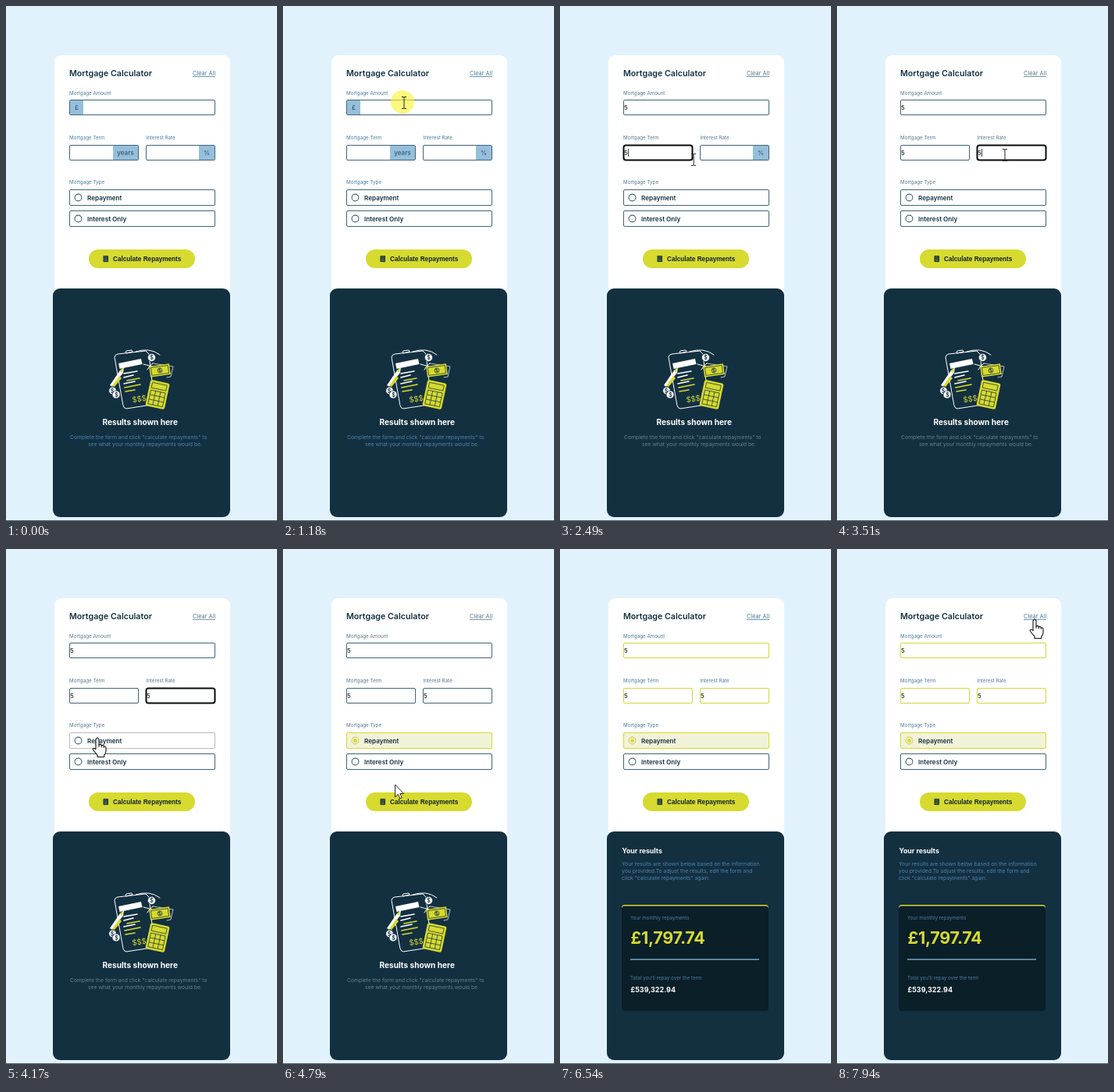
An HTML page that plays this animation: 347 px wide and 660 px high, repeating every 8 s.

```html
<!DOCTYPE html>
<html lang="en">
<head>
<meta charset="utf-8">
<title>Mortgage Calculator</title>
<style>
  html, body { margin: 0; width: 100%; height: 100%; overflow: hidden; background: #e1f2fd; }
  svg { display: block; width: 347px; height: 660px; font-family: Inter, "Open Sans", sans-serif; --soft: #4a7c9f; --sub: #4d84ad; }
  svg.muted { --soft: #58788b; --sub: #64818f; }
  .label { font-size: 6.25px; fill: var(--soft); }
  .sub { font-size: 6.8px; fill: var(--sub); }
  .bold { font-weight: 700; fill: #fff; }
  .dark { font-weight: 600; fill: #133041; }
  .unit { font-size: 8px; font-weight: 600; fill: #40657c; text-anchor: middle; }
  .box { fill: #fff; stroke: #41647a; }
  .box.hover { stroke: #b9bdbd; }
  .box.valid { stroke: #d3d63e; }
  .box.chosen { fill: #f2f2d8; stroke: #d7da2f; }
  .box.focus { stroke: #080c0f; stroke-width: 2; }
  .lime { fill: #d7da2f; }
  .pen { fill: none; stroke: #fff; stroke-linecap: round; stroke-linejoin: round; }
  .limePen { fill: none; stroke: #d7da2f; stroke-linecap: round; stroke-width: 1.6; }
  .ink { fill: none; stroke: #133041; stroke-width: .7; }
</style>
</head>
<body>
<svg id="stage" viewBox="0 0 347 660">
  <rect width="347" height="660" fill="#e1f2fd"/>
  <rect y="659" width="347" height="1" fill="#4b5f6c"/>
  <path d="M62 400V72a9 9 0 0 1 9-9h207a9 9 0 0 1 9 9v328z" fill="#fff"/>
  <rect x="60" y="362" width="227" height="293" rx="9" fill="#133041"/>

  <text x="81" y="90" class="dark" font-size="10.7">Mortgage Calculator</text>
  <text x="239" y="89" font-size="7.4" fill="var(--soft)">Clear All</text>
  <path d="M239 90.5h29" stroke="var(--soft)" stroke-width=".8"/>
  <text x="81" y="114" class="label">Mortgage Amount</text>
  <text x="81" y="171" class="label">Mortgage Term</text>
  <text x="179.5" y="171" class="label">Interest Rate</text>
  <text x="81" y="228" class="label">Mortgage Type</text>
  <g id="fields"></g>
  <g id="rows"></g>

  <rect x="106" y="312" width="136" height="24" rx="12" class="lime"/>
  <rect x="124.5" y="320" width="6.5" height="8" rx=".8" fill="#133041"/>
  <path d="M125.7 321.8h4.1M125.7 324.4h4.1M125.7 326.4h4.1" stroke="#d7da2f" stroke-width=".8" stroke-dasharray="1 .55"/>
  <text x="137" y="327" font-family="'Liberation Sans', Arial, sans-serif" font-weight="700" font-size="8.2" fill="#10222d">Calculate Repayments</text>

  <g id="empty">
    <path class="pen" d="M139 450q0-3 4-4l36-4 4 4 7 62q-4 3-10 4l-26 4q-3 0-4-4z"/>
    <path class="pen" d="M153 444l1-2 7-1 1 2-8 2M166 443q18-6 31 4M181 466q3-6 7-8M176 459l11 3"/>
    <path d="M144 458l29-6 1.5 7-29 6z" fill="#fff"/>
    <path class="pen" stroke-width="1.6" d="M151 471l17-3M151 476l12-3M151 484l14-3"/>
    <path class="limePen" d="M155 480l16-3M152 489l20-4M153 494l12-2"/>
    <path d="M133 486l13-19 5-4-1 7-14 18z" fill="#fff"/>
    <path class="lime" d="M136 487l9-13 3 3-9 11zM150 463l-4 5 3 2z"/>
    <text x="162" y="508" font-size="9.5" class="lime" transform="rotate(-8 162 508)">$$$</text>
    <g fill="#fff" stroke="#133041" stroke-width=".7">
      <circle cx="186.5" cy="450.5" r="5"/><circle cx="136.5" cy="493" r="4.8"/><circle cx="141" cy="498" r="5"/>
    </g>
    <g font-size="7" text-anchor="middle" class="dark">
      <text x="186.5" y="453">$</text><text x="136" y="495.5">$</text><text x="141.5" y="500.5">$</text>
    </g>
    <path class="pen" stroke-width=".7" d="M188 458l26 4-3 13-5 1"/>
    <g transform="rotate(-8 197 467)">
      <rect x="184" y="460" width="26" height="14" class="lime"/>
      <rect x="186" y="462" width="22" height="10" class="ink"/><circle cx="197" cy="467" r="3" class="ink"/>
      <text x="197" y="469" font-size="6" text-anchor="middle" class="dark">$</text>
    </g>
    <g transform="rotate(12 194 498)">
      <rect x="181.5" y="481" width="25" height="34" rx="2.5" class="lime"/>
      <rect x="184.5" y="484" width="19" height="7" class="ink"/>
      <path class="ink" d="M184.5 494h19v18h-19zM190.8 494v18M197.2 494v18M184.5 500h19M184.5 506h19"/>
    </g>
    <text x="123.5" y="537" class="bold" font-size="10.1">Results shown here</text>
    <text x="82" y="555" class="sub">Complete the form and click "calculate repayments" to</text>
    <text x="105" y="564" class="sub">see what your monthly repayments would be.</text>
  </g>

  <g id="results">
    <text x="79.5" y="390" class="bold" font-size="8.75">Your results</text>
    <text x="79" y="406" class="sub">Your results are shown below based on the information</text>
    <text x="79" y="415" class="sub">you provided.To adjust the results, edit the form and</text>
    <text x="79" y="424" class="sub">click "calculate repayments" again.</text>
    <rect x="79" y="456" width="188" height="12" rx="4" class="lime"/>
    <path d="M79 461q0-3.5 4-3.5h180q4 0 4 3.5v127a4 4 0 0 1-4 4H83a4 4 0 0 1-4-4z" fill="#0b1f29"/>
    <text x="90" y="475" class="label">Your monthly repayments</text>
    <text x="90.5" y="506" font-size="21.5" letter-spacing="-.3" font-weight="700" class="lime">£1,797.74</text>
    <path d="M90 526h165" stroke="#75a6c2" stroke-width="1.6"/>
    <text x="90" y="552" class="label">Total you'll repay over the term</text>
    <text x="90.5" y="568" class="bold" font-size="9">£539,322.94</text>
  </g>

  <circle id="halo" r="15" fill="#f8f42e" opacity=".62"/>
  <g id="pointer">
    <path id="arrow" d="M0 0V16L3.8 12.4 6.3 18 8.7 17 6.2 11.5H11Z" fill="#fff" stroke="#111" stroke-width=".9"/>
    <path id="beam" d="M-3-7.5H-1L0-6.8 1-7.5H3M0-6.8V6.8M-3 7.5H-1L0 6.8 1 7.5H3" fill="none" stroke="#222"/>
    <g id="hand">
      <path d="M-2 2Q0-2 2 2V9.5Q4.500 7 5.300 10 7.500 8.300 8.300 11 11 10 11 13.500V17Q11 20 8.800 22V24.500H0V22Q-2 20-5.500 15.500-6.500 11.500-2 14.500Z" fill="#fff" stroke="#111" stroke-width="1.1" stroke-linejoin="round"/>
      <path d="M2 9.500V12M5.300 10V12.500M8.300 11V13" stroke="#111" stroke-width=".9"/>
    </g>
  </g>
</svg>
<script>
const LOOP = 8000, CALCULATED = 5240, CHOSEN = 4340;
const $ = id => document.getElementById(id);
const show = (el, on) => el.style.display = on ? '' : 'none';

const fields = [
  { x: 81, y: 120, w: 187, unit: '£', unitX: 82, unitW: 17, focus: 1260, typed: 1480, blur: 2070 },
  { x: 81, y: 178, w: 89, unit: 'years', unitX: 137, unitW: 32, focus: 2160, typed: 2330, blur: 3030 },
  { x: 179, y: 178, w: 89, unit: '%', unitX: 247, unitW: 20, focus: 3100, typed: 3510, blur: CHOSEN },
].map(f => ({ ...f, h: 20 }));
const rows = [
  { x: 81, y: 235, w: 187, h: 21, name: 'Repayment', chosen: CHOSEN },
  { x: 81, y: 262, w: 187, h: 21, name: 'Interest Only', chosen: Infinity },
];
const links = [{ x: 106, y: 312, w: 136, h: 24 }, { x: 239, y: 80, w: 29, h: 13 }];
const clicks = [[1180, 1260], [1990, 2070], [2950, 3030], [4340, 4420], [5120, 5200]];

// time, x, y, and whether the pointer reaches this point at steady speed
const path = [
  [0, 262, 700], [99.9, 262, 700], [100, 262, 573], [840, 145, 139], [940, 145, 139],
  [1010, 155, 124], [1480, 155, 124], [1760, 140, 195], [2330, 140, 195],
  [2490, 171, 197, 1], [2800, 215, 191, 1], [3510, 215, 191],
  [4170, 117, 242], [4290, 117, 251], [4430, 117, 251], [4960, 152, 318],
  [5850, 152, 318], [6540, 246, 662], [6869, 287, 662], [6870, 287, 650],
  [7300, 232, 300, 1], [7670, 246, 95, 1], [7720, 246, 95], [7940, 253, 90], [LOOP, 253, 90],
];

const boxRect = ({ x, y, w, h }) =>
  `<rect class="box" x="${x + .5}" y="${y + .5}" width="${w - 1}" height="${h - 1}" rx="1.5"/>`;

$('fields').innerHTML = fields.map(f => `<g>${boxRect(f)}
  <g><rect x="${f.unitX}" y="${f.y + 1}" width="${f.unitW}" height="18" fill="#95bfda"/>
  <text class="unit" x="${f.unitX + f.unitW / 2}" y="${f.y + 13}">${f.unit}</text></g>
  <text x="${f.x + 1}" y="${f.y + 13}" font-size="8" fill="#111">5</text>
  <rect y="${f.y + 5}" width=".8" height="10" fill="#111"/></g>`).join('');

$('rows').innerHTML = rows.map(r => `<g>${boxRect(r)}
  <circle cx="92.5" cy="${r.y + 10.5}" r="4.4" fill="none" stroke-width="1.1"/>
  <circle cx="92.5" cy="${r.y + 10.5}" r="2.6" fill="#d8da4a"/>
  <text class="dark" x="104" y="${r.y + 13.5}" font-size="8.15">${r.name}</text></g>`).join('');

function pointerAt(t) {
  const i = path.findIndex(p => p[0] > t);
  const [t0, x0, y0] = path[i - 1], [t1, x1, y1, steady] = path[i];
  const p = (t - t0) / (t1 - t0), k = steady ? p : p * p * (3 - 2 * p);
  return [x0 + (x1 - x0) * k, y0 + (y1 - y0) * k];
}

function render(t) {
  const [px, py] = pointerAt(t);
  const over = (b, pad = 0) =>
    px >= b.x - pad && px <= b.x + b.w + pad && py >= b.y - pad && py <= b.y + b.h + pad;
  const done = t >= CALCULATED;

  fields.forEach((f, i) => {
    const [box, unit, value, caret] = $('fields').children[i].children;
    const focused = t >= f.focus && t < f.blur, typed = t >= f.typed;
    box.setAttribute('class', 'box' + (focused ? ' focus' : done ? ' valid' : ''));
    box.setAttribute('rx', focused ? 3 : 1.5);
    show(unit, t < f.focus);
    show(value, typed);
    const idle = t - (typed ? f.typed : f.focus);
    show(caret, focused && idle % 1060 < 530);
    caret.setAttribute('x', f.x + (typed ? 6 : 2));
  });

  rows.forEach((r, i) => {
    const [box, ring, dot] = $('rows').children[i].children;
    const chosen = t >= r.chosen;
    box.setAttribute('class', 'box' + (chosen ? ' chosen' : over(r) ? ' hover' : ''));
    ring.setAttribute('stroke', chosen ? '#d2d45c' : '#41647a');
    show(dot, chosen);
  });

  $('stage').setAttribute('class', t >= 2070 && t < CALCULATED ? 'muted' : '');
  show($('empty'), !done);
  show($('results'), done);

  const kind = [...rows, ...links].some(b => over(b)) ? 'hand'
    : fields.some(f => over(f, 2)) ? 'beam' : 'arrow';
  ['arrow', 'beam', 'hand'].forEach(id => show($(id), id === kind));
  $('pointer').setAttribute('transform', `translate(${px} ${py})`);
  $('halo').setAttribute('transform', `translate(${px - 2} ${py - 1})`);
  show($('halo'), clicks.some(([a, b]) => t >= a && t < b));
}

const start = performance.now();
function tick() {
  render((performance.now() - start) % LOOP);
  requestAnimationFrame(tick);
}
tick();
</script>
</body>
</html>
```
